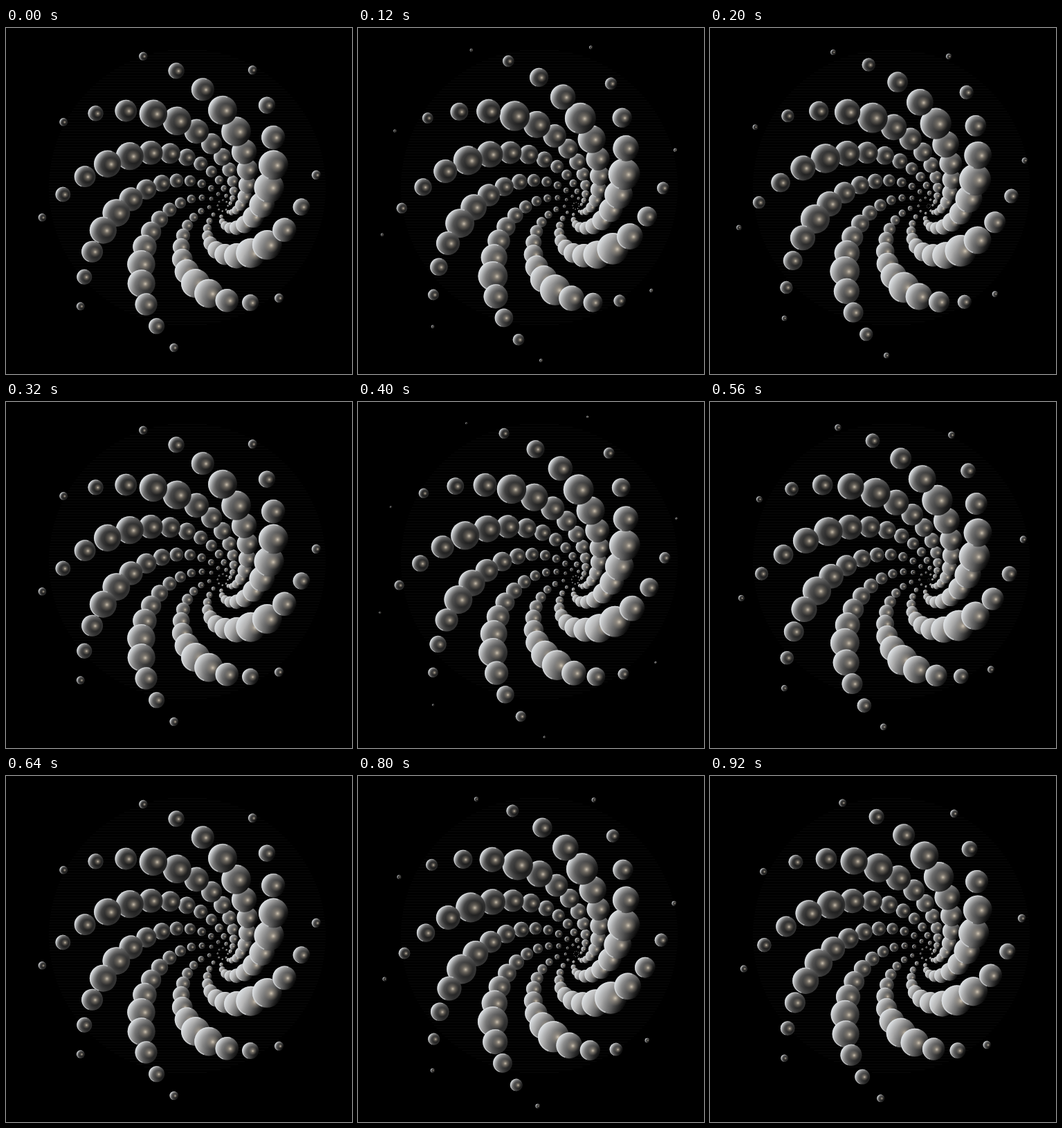
An HTML page with a canvas for the animation above (960 ms loop, 500 px wide and 500 px high).

```html
<!DOCTYPE html>
<html>
<head>
<meta charset="utf-8">
<style>
html, body { margin: 0; height: 100%; overflow: hidden; background: #000; }
canvas { display: block; }
</style>
</head>
<body>
<canvas id="stage" width="500" height="500"></canvas>
<script>
const ctx = document.getElementById('stage').getContext('2d');
const ARMS = 8, DEPTH = 14, PERIOD = 320, STEP = 40;
const rad = deg => deg * Math.PI / 180;
const clamp = v => Math.max(0, Math.min(1, v));

// Place a ball on a tilted cone seen in perspective; k runs from rim to apex.
function locate(arm, k) {
  const shrink = 1 / (1 + 0.07 * k);
  const ring = 205 * (1 - k / DEPTH) * shrink;
  const angle = -100.2 + 11.12 * k - 360 / ARMS * arm;
  const cos = Math.cos(rad(angle + 3.8)), sin = Math.sin(rad(angle + 1.9));
  const near = 1 + 0.00075 * ring * cos;
  const facing = 0.55 + 0.4 * Math.cos(rad(angle - 42));
  return {
    x: 317.5 - 0.53 * ring + 0.00027 * ring * ring + 0.972 * ring * cos * near,
    y: 257.5 - 0.08 * ring + 0.00016 * ring * ring + 1.038 * ring * sin * near,
    r: Math.min(6.2 * (k + 1), 2.66 * (DEPTH - k)) * shrink * (1 + near) / 2,
    lit: facing * (0.3 + 0.7 * clamp(k / 4)),
    right: (1 + cos) / 2
  };
}

function paint(gradient, stops) {
  stops.forEach(([at, color]) => gradient.addColorStop(at, color));
  ctx.fillStyle = gradient;
  ctx.fill();
}

const gray = v => `rgb(${v},${v},${v})`;

function drawBall({ x, y, r, lit, right }) {
  if (r < 0.2) return;
  ctx.save();
  ctx.translate(x, y);
  ctx.scale(r, r);
  ctx.beginPath();
  ctx.arc(0, 0, 1, 0, 7);
  const mid = 115 + 80 * lit;
  paint(ctx.createLinearGradient(-0.88, -0.48, 0.9, 0.45), [
    [0, '#dce0e3'],
    [0.3, gray(mid)],
    [0.62, gray(mid * 0.6)],
    [0.85, gray(mid * (0.4 - 0.2 * right))],
    [1, gray(55 * (1 - right))]
  ]);
  const shade = 0.68 - 0.65 * lit;
  paint(ctx.createRadialGradient(0.08, 0.05, 0, 0.06, 0.04, 0.94), [
    [0, `rgba(0,0,0,${shade})`],
    [0.55, `rgba(0,0,0,${shade * 0.85})`],
    [1, 'rgba(0,0,0,0)']
  ]);
  paint(ctx.createRadialGradient(0.28, 0.03, 0, 0.28, 0.03, 0.5), [
    [0, 'rgba(228,216,196,.85)'],
    [0.4, 'rgba(180,168,150,.45)'],
    [1, 'rgba(150,140,125,0)']
  ]);
  ctx.beginPath();
  ctx.arc(0, 0, 0.96, rad(110), rad(290));
  ctx.lineWidth = 0.08;
  ctx.strokeStyle = 'rgba(225,229,232,.6)';
  ctx.stroke();
  ctx.restore();
}

function drawScanlines() {
  ctx.fillStyle = 'rgba(255,255,255,.035)';
  for (let y = 32; y < 430; y += 4) {
    const half = Math.sqrt(Math.max(0, 200 ** 2 - (y - 230) ** 2));
    ctx.fillRect(262 - half, y, half * 2, 1);
  }
}

function frame(now) {
  const phase = Math.floor(now % PERIOD / STEP) * STEP / PERIOD;
  ctx.fillStyle = '#000';
  ctx.fillRect(0, 0, 500, 500);
  drawScanlines();
  for (let i = DEPTH - 1; i >= -1; i--)
    for (let arm = 0; arm < ARMS; arm++) drawBall(locate(arm, i + phase));
  requestAnimationFrame(frame);
}
requestAnimationFrame(frame);
</script>
</body>
</html>
```
